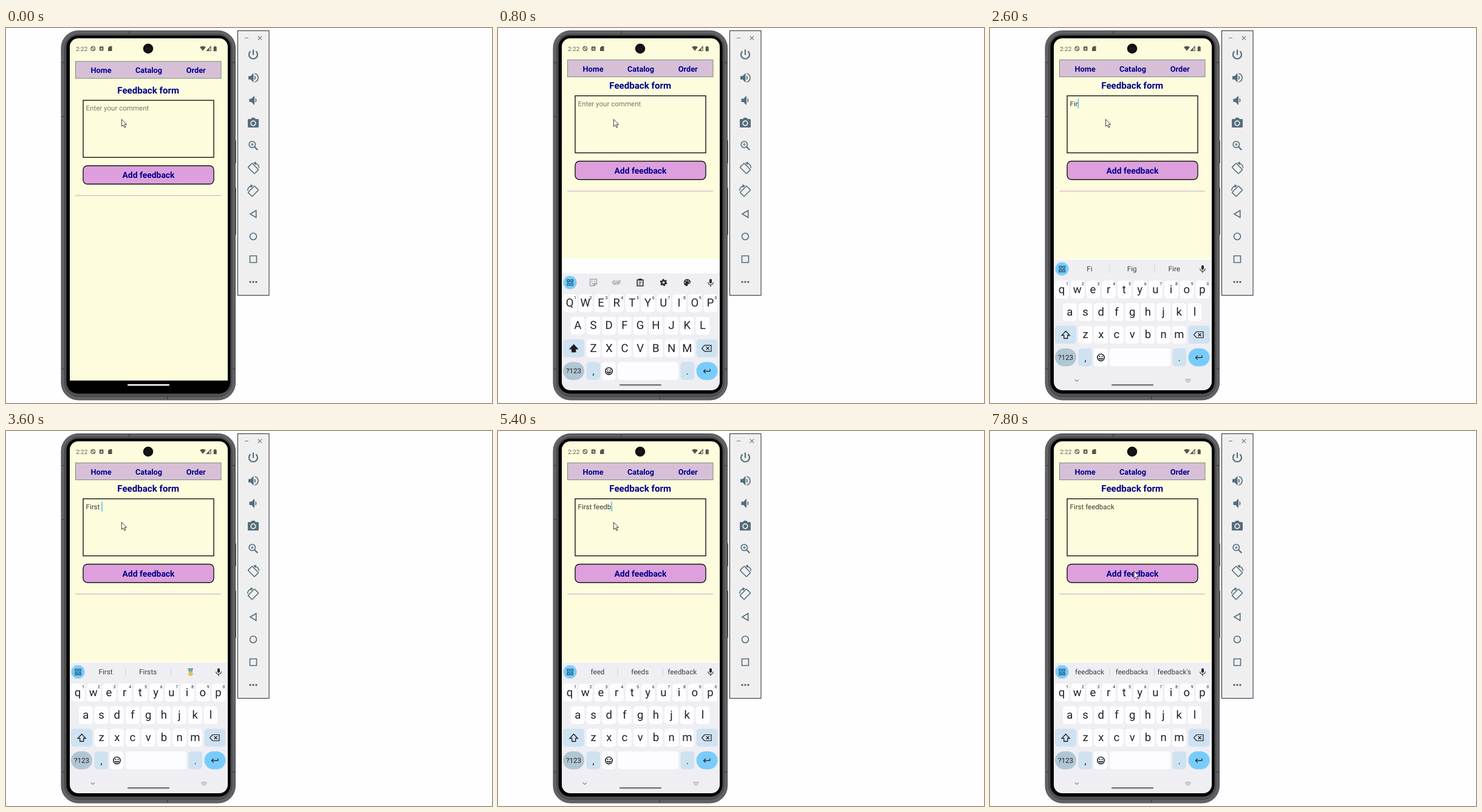
Recreate the animation shown at these times as an HTML page. Size 800 by 618 pixels, loop 8000 ms.

```html
<!DOCTYPE html>
<html lang="en">
<head>
<meta charset="utf-8">
<title>Feedback form</title>
<style>
html, body { margin: 0; height: 100%; overflow: hidden; background: #fefdff }
svg { display: block; width: 100vw; height: 100vh; font-family: Roboto, sans-serif; text-rendering: geometricPrecision }
text { white-space: pre }
.mid { text-anchor: middle }
.nav { font-weight: 700; fill: #00008b; text-anchor: middle }
.line { fill: none; stroke: currentColor; stroke-width: 1.6 }
.thin { fill: none; stroke: currentColor; stroke-width: 1.2 }
.bold { fill: none; stroke: currentColor; stroke-width: 2.2 }
.fill { fill: currentColor }
</style>
</head>
<body>
<svg viewBox="0 0 800 618">
  <defs>
    <clipPath id="screen"><rect x="105" y="17" width="260" height="580" rx="14"/></clipPath>
  </defs>

  <!-- phone body -->
  <g fill="#4a4a4d">
    <rect x="375" y="185" width="4" height="38" rx="1"/>
    <rect x="375" y="263" width="4" height="78" rx="1"/>
  </g>
  <rect x="91" y="4.5" width="286.5" height="608.5" rx="28" fill="#626265" stroke="#505053"/>
  <rect x="96.500" y="10" width="275.500" height="597.500" rx="23" fill="#505053" stroke="#434346"/>
  <rect x="99.500" y="12.500" width="270" height="590" rx="19" fill="#000"/>
  <path d="M92 57h4M92 146h4M92 562h4M373 57h4M373 562h4M203 5v4M266 608v4" stroke="#48484b" stroke-width="2"/>

  <g clip-path="url(#screen)">
    <rect x="105" y="17" width="260" height="564" fill="#fdfddd"/>
    <rect id="blank" x="105" y="380.500" width="260" height="200.5" fill="#fefefe"/>

    <!-- status bar -->
    <text x="115" y="37.700" font-size="10" fill="#62625a">2:22</text>
    <g color="#55554e">
      <circle class="thin" cx="143.300" cy="34" r="3.300"/><path class="thin" d="M141 31.700l4.600 4.600"/>
      <rect class="fill" x="153.800" y="30.500" width="6.600" height="7" rx="1"/>
      <text class="mid" x="157.100" y="36.300" font-size="5.500" font-weight="700" fill="#fdfddd">A</text>
      <path class="fill" d="M168 32.500l2.500-2.500h4v8h-6.500zM319 31.500q5-3.500 10 0l-5 6.300zM341.700 31h1.300v-1h2.400v1h1.300v7.200h-5z"/>
      <path class="thin" d="M330.500 37.500h6.500v-7z"/>
      <path class="fill" d="M330.500 37.500h4v-4.300z"/>
    </g>
    <circle cx="234" cy="34" r="8.300" fill="#121214"/>
    <path d="M231 34h1.500m3 0h1.500" stroke="#444"/>

    <!-- page -->
    <g id="tabs">
      <rect x="114.500" y="55" width="239.5" height="28" fill="#d8bfd8" stroke="#759075"/>
      <g class="nav" font-size="12.700">
        <text x="156.500" y="74">Home</text><text x="235" y="74">Catalog</text><text x="312.700" y="74">Order</text>
      </g>
    </g>
    <g id="form">
      <text class="nav" x="234.200" y="107.700" font-size="15.100">Feedback form</text>
      <rect x="127" y="119.200" width="215" height="94" fill="none" stroke="#151515" stroke-width="1.400"/>
      <rect id="caret" y="124" width="2.400" height="16" fill="#7cc6ee" opacity=".85"/>
      <text id="comment" x="131.500" y="136.200" font-size="11.550"></text>
      <rect x="127" y="227" width="215" height="30.300" rx="7" fill="#dda0dd" stroke="#151515" stroke-width="1.400"/>
      <text class="nav" x="234.500" y="247" font-size="13.900">Add feedback</text>
      <path d="M114 276.200h240" stroke="#d8bfd8" stroke-width="1.600"/>
    </g>

    <g id="board">
      <rect x="105" y="382" width="260" height="216" fill="#efeef3"/>
      <circle cx="118.500" cy="397" r="11" fill="#78ccfb"/>
      <path class="thin" color="#174a66" d="M114 392.500h3.500v3.500h-3.500zM119.800 392.500h3.500v3.500h-3.500zM114 398.300h3.500v3.500h-3.500zM119.800 398.300h3.500v3.500h-3.500z"/>
      <g color="#2b2c2f">
        <rect class="fill" x="348" y="391" width="4" height="7.500" rx="2"/>
        <path class="thin" d="M345.700 396.500a4.300 4.300 0 0 0 8.600 0M350 400.800v3"/>
      </g>
      <g id="tools">
        <g color="#96979b">
          <path class="thin" d="M151.500 391.500h11v7l-4 4h-7zM162.500 398.500h-4v4M154 398q3 3.500 5 0"/>
          <path class="fill" d="M153.800 394h1.700v1.700h-1.700zM158.400 394h1.700v1.700h-1.700z"/>
          <text class="mid fill" x="195.300" y="400.500" font-size="9.500" font-weight="700">GIF</text>
        </g>
        <g color="#2b2c2f">
          <path class="line" d="M229.200 392.500h9.600v10h-9.600z"/>
          <path class="fill" d="M231.500 390.500h5v3.500h-5z"/>
          <path class="thin" d="M231.500 396.700h5M231.500 399.700h3.500"/>
          <circle cx="272.500" cy="397" r="3.200" fill="none" stroke="currentColor" stroke-width="2.600"/>
          <circle cx="272.500" cy="397" r="5.100" fill="none" stroke="currentColor" stroke-width="1.800" stroke-dasharray="2.670"/>
          <path class="fill" d="M311 391.300a5.800 5.800 0 0 0 0 11.500c2 0 1-2 1.500-3 1-1 4.500 0 4.500-3.500s-3-5-6-5z"/>
          <g fill="#efeef3"><circle cx="308" cy="397" r="1"/><circle cx="309.700" cy="394" r="1"/><circle cx="313" cy="394" r="1"/><circle cx="315" cy="396.700" r="1"/></g>
        </g>
      </g>
      <g id="hints" font-size="11.700" fill="#3c3d42">
        <path d="M197 390v14M271 390v14" stroke="#cfd1d8"/>
        <text class="mid" x="164" y="401"></text><text class="mid" x="233.700" y="401"></text><text class="mid" x="303.300" y="401"></text>
        <g id="medal">
          <path d="M299.500 391h8.500l-2 7h-4.500z" fill="#5c86b4"/><path d="M302 391h3.500v6h-3.500z" fill="#7fb37c"/>
          <circle cx="303.800" cy="400" r="3.800" fill="#d3c467"/>
        </g>
      </g>
      <g id="keys"></g>
      <g color="#1d1e21">
        <path id="shift" d="M124.700 499.500l6.500 7h-3.500v5h-6v-5h-3.500z" stroke="currentColor" stroke-width="1.300"/>
        <path class="thin" d="M340 500.500h11v10h-11l-4.500-5zM342.700 503l5 5m0-5l-5 5"/>
        <circle class="line" cx="182.500" cy="543" r="5.700"/>
        <path class="thin" d="M179.300 544.500q3.200 4 6.400 0z"/>
        <path class="fill" d="M179.500 540.300h1.900v1.900h-1.900zM183.600 540.300h1.900v1.900h-1.900z"/>
        <path class="thin" d="M349 539.500v3.700h-10.500m3.200-3.200l-3.200 3.200 3.200 3.200"/>
      </g>
      <g color="#85868b">
        <path class="thin" d="M139.800 579.300l3 3 3-3"/>
        <path class="thin" stroke-dasharray="1.300 .7" d="M321.500 578.800h9M321.500 581h9M323.500 583.300h5"/>
      </g>
    </g>
    <rect id="pill" x="200" y="587" width="69" height="2.400" rx="1.200"/>
  </g>

  <!-- emulator toolbar -->
  <rect x="381.500" y="4.500" width="51.500" height="436" fill="#efeff0" stroke="#2b2b2b"/>
  <path class="thin" color="#777" d="M393 16.500h6M414.700 13.300l6.400 6.400m0-6.400l-6.400 6.400"/>
  <g color="#546e7a">
    <path class="bold" transform="translate(407 44)" d="M0-8.500v9M-4.500-5.600a7 7 0 1 0 9 0"/>
    <g transform="translate(407 82)">
      <path class="fill" d="M-8-2.700h3.500l5-5v15.400l-5-5h-3.500zM2-4q4 4 0 8z"/>
      <path class="line" d="M2.500-7a7.200 7.200 0 0 1 0 14"/>
    </g>
    <path class="fill" d="M400.500 116.500h3.500l5-5v15.400l-5-5h-3.500zM410.500 115q4 4.200 0 8.400z"/>
    <g transform="translate(407 156)">
      <path class="fill" d="M-7.500-6h3.500l2-2.300h4l2 2.300h3.500q1.500 0 1.500 1.500v11q0 1.500-1.500 1.500h-15q-1.500 0-1.500-1.500v-11q0-1.500 1.500-1.500z"/>
      <circle r="3.800" cy="1" fill="#546e7a" stroke="#efeff0" stroke-width="1.700"/>
    </g>
    <g transform="translate(407 194)">
      <circle class="line" cx="-1.700" cy="-2" r="5.200"/><path class="thin" d="M-4.300-2h5.200M-1.700-4.600v5.200"/>
      <path class="bold" d="M2.300 2l5 5"/>
    </g>
    <g id="turn">
      <rect class="line" x="-4.800" y="-7.500" width="9.600" height="15" rx="1" transform="rotate(-45)"/>
      <path class="line" d="M1.500-9q7 .5 8 8M4.500-10.500l-3 1.500 2.500 2.500"/>
    </g>
    <use href="#turn" id="turnBack"/>
    <path class="line" d="M402 306.500l9.700-5.800v11.600z"/>
    <circle class="line" cx="407" cy="343.500" r="5.500"/>
    <path class="line" d="M401.500 375.500h11v11h-11z"/>
    <g class="fill"><circle cx="402" cy="418.500" r="1.700"/><circle cx="407" cy="418.500" r="1.700"/><circle cx="412" cy="418.500" r="1.700"/></g>
  </g>

  <path id="mouse" d="M0 0v11.800l2.700-2.500 2 4.300 1.900-.9-2-4.200h3.700z" fill="#fff" stroke="#222" stroke-width=".9"/>
</svg>

<script>
const $ = id => document.getElementById(id);
const show = (id, on) => $(id).style.display = on ? '' : 'none';
const move = (id, x, y) => $(id).setAttribute('transform', `translate(${x} ${y})`);

$('turn').setAttribute('transform', 'translate(407 231.500)');
$('turnBack').setAttribute('transform', 'translate(814 37.500) scale(-1 1)');

// Keyboard
const WHITE = '#fdfdff', BLUE = '#cfe2f2', PITCH = 25.72;
const box = (x, y, w, fill, r = 5) =>
  `<rect x="${x}" y="${y}" width="${w}" height="29.500" rx="${r}" fill="${fill}"/>`;
const label = (x, y, size, s, extra = '') =>
  `<text class="mid" x="${x}" y="${y}" font-size="${size}" fill="#202124" ${extra}>${s}</text>`;

let keys = box(107, 490.7, 35, BLUE) + box(326.5, 490.7, 35, BLUE) +
  box(107, 528, 35, '#b1c6d3', 14.7) + label(124.5, 547, 11.5, '?123') +
  box(145.5, 528, 22.5, BLUE) + label(157, 549, 16, ',') +
  box(171, 528, 22.7, WHITE) + box(197, 528, 100, WHITE) +
  box(300.5, 528, 22.5, BLUE) + label(311.700, 549, 16, '.') +
  box(326.5, 528, 35, '#78ccfb', 14.7);
['qwertyuiop', 'asdfghjkl', 'zxcvbnm'].forEach((row, r) => {
  [...row].forEach((ch, i) => {
    const x = [118.5, 131.2, 157][r] + PITCH * i, y = 416.2 + 37.25 * r;
    keys += box(x - 11.4, y, 22.8, WHITE) + label(x - (r ? 0 : .5), y + 20.5, 18.5, ch, 'data-key');
    if (!r) keys += label(x + 8.5, y + 8, 7, (i + 1) % 10);
  });
});
$('keys').innerHTML = keys;
const letters = document.querySelectorAll('[data-key]');
const slots = $('hints').querySelectorAll('text');

// Typing
const MESSAGE = 'First feedback';
const TIMES = [2000, 2200, 2600, 2800, 3200, 3600, 4200, 4600, 4800, 5000, 5400, 5600, 5800, 6200];
const HINTS = [
  'F For From', 'Fi Fig Fire', 'Fir Fire First', 'Firs First Firsts', 'First Firsts', 'time of and',
  'f floor flight', 'fe few feel', 'fee feel feed', 'feed feeds feedback', 'feedb feedback feedbacks',
  'feedba feedback feedbacks', 'feedbac feedback feedbacks', "feedback feedbacks feedback's"
].map(s => s.split(' '));
const typedAt = t => TIMES.filter(k => k <= t).length;
const clamp = v => Math.max(0, Math.min(1, v));

function draw(t) {
  const open = t >= 600, count = typedAt(t), hinted = typedAt(t - 400);
  show('blank', open);
  show('board', open);
  move('tabs', 0, open ? -2.5 : 0);
  move('form', 0, open ? -7.5 : 0);

  const rise = clamp((t - 400) / 600);
  move('board', 0, 202 * (1 - rise) ** 2);
  $('board').setAttribute('opacity', clamp(rise * 1.5));
  $('pill').setAttribute('fill', rise > .5 ? '#77787b' : '#fff');

  const text = $('comment');
  text.textContent = count ? MESSAGE.slice(0, count) : 'Enter your comment';
  text.setAttribute('fill', count ? '#3a3a36' : '#77776d');
  const width = count ? text.getComputedTextLength() : 0;
  $('caret').setAttribute('x', 131 + width);
  const lastKey = count ? TIMES[count - 1] : 200;
  show('caret', t >= 200 && (t - lastKey) % 1000 < 500);

  letters.forEach(el => {
    const ch = el.textContent;
    el.textContent = count ? ch.toLowerCase() : ch.toUpperCase();
  });
  $('shift').setAttribute('fill', count ? 'none' : 'currentColor');

  show('tools', !hinted);
  show('hints', hinted);
  show('medal', hinted === 5);
  if (hinted) slots.forEach((el, i) => el.textContent = HINTS[hinted - 1][i] || '');

  const p = clamp((t - 6600) / 800), ease = p * p * (3 - 2 * p);
  move('mouse', 190.3 + 46.7 * ease, 150.5 + 80.5 * ease);
}

const start = performance.now();
function tick() {
  const t = (performance.now() - start) % 8000;
  draw(Math.floor(t / 200) * 200);
  requestAnimationFrame(tick);
}
tick();
</script>
</body>
</html>
```
